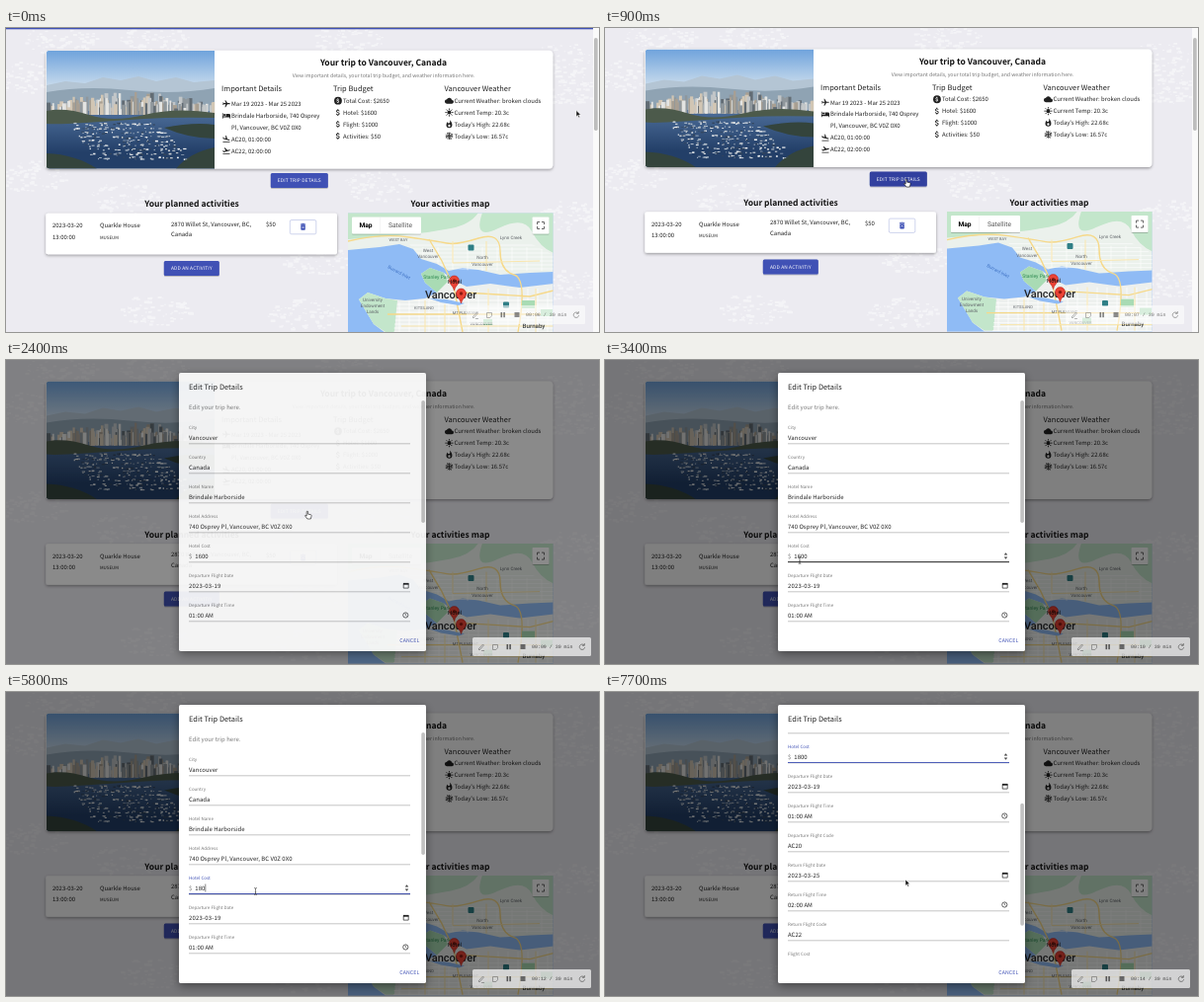
An HTML page for the animation above (8000 ms loop, 600x308 px).

```html
<!DOCTYPE html>
<html lang="en">
<head>
<meta charset="utf-8">
<title>Trip details</title>
<style>
  html, body { margin: 0; width: 100%; height: 100%; overflow: hidden; background: #ecebf1; }
  svg { display: block; width: 600px; height: 308px; }
  text { font-family: "Noto Sans CJK JP", "Noto Sans CJK SC", "Source Sans Pro", "Noto Sans", sans-serif;
    white-space: pre; text-rendering: geometricPrecision; }
  .map text { font-family: Roboto, Arial, sans-serif; }
  text.mono { font-family: "Liberation Mono", "DejaVu Sans Mono", monospace; }
</style>
</head>
<body>
<svg id="stage" viewBox="0 0 600 308" xmlns="http://www.w3.org/2000/svg"></svg>
<script>
const BLUE = '#3f51b5', INK = '#212121', GREY = '#757575';
const LOOP = 8000, STEP = 100;

let seed = 11;
const rnd = (a = 0, b = 1) => {
  seed = (seed * 16807) % 2147483647;
  return a + (b - a) * seed / 2147483647;
};
const many = (n, make) => Array.from({ length: n }, (_, i) => make(i)).join('');
const text = (x, y, s, size = 5.95, fill = INK, extra = '') =>
  `<text x="${x}" y="${y}" font-size="${size}" fill="${fill}" ${extra}>${s}</text>`;
const rect = (x, y, w, h, fill, extra = '') =>
  `<rect x="${x}" y="${y}" width="${w}" height="${h}" fill="${fill}" ${extra}/>`;
const path = (d, fill, extra = '') => `<path d="${d}" fill="${fill}" ${extra}/>`;
const line = (d, stroke, width, extra = '') =>
  path(d, 'none', `stroke="${stroke}" stroke-width="${width}" ${extra}`);
const MID = 'text-anchor="middle"', BOLD = 'font-weight="700"';

// Icons live in a 24 unit box.
const SHAPES = {
  plane: 'M21 16v-2l-8-5V3.5C13 2.7 12.3 2 11.5 2S10 2.7 10 3.5V9l-8 5v2l8-2.5V19l-2 1.5V22l3.5-1 3.5 1v-1.5L13 19v-5.5z',
  bed: 'M7 13a3 3 0 1 0 0-6 3 3 0 0 0 0 6zm12-6h-8v7H3V5H1v15h2v-3h18v3h2v-9a4 4 0 0 0-4-4z',
  land: 'M2.5 19h19v2h-19zM9.7 13.3l9.6 2.5c.8.2 1.6-.3 1.8-1 .2-.8-.2-1.6-1-1.9l-5.3-1.4L12 2.5 10.1 2v8.3L5.2 9l-1-2.4-1.4-.4v5.2z',
  takeoff: 'M2.5 19h19v2h-19zM22 9.6c-.2-.8-1-1.2-1.8-1L15 10 8 3.6l-1.9.5 4.1 7.1-5 1.4-2-1.6-1.4.4 2.6 4.5L21 11.5c.8-.2 1.2-1 1-1.9z',
  dollar: 'M11.8 10.9c-2.3-.6-3-1.2-3-2.1 0-1.1 1-1.9 2.7-1.9 1.8 0 2.4.9 2.5 2.1h2.2c-.1-1.7-1.1-3.3-3.2-3.8V3h-3v2.2c-1.9.4-3.5 1.7-3.5 3.6 0 2.3 1.9 3.4 4.7 4.1 2.5.6 3 1.5 3 2.4 0 .7-.5 1.8-2.7 1.8-2.1 0-2.9-.9-3-2.1H6.3c.1 2.2 1.8 3.4 3.7 3.8V21h3v-2.2c2-.3 3.5-1.5 3.5-3.5 0-2.8-2.4-3.8-4.7-4.4z',
  cloud: 'M19.4 10A7.5 7.5 0 0 0 5.4 8 6 6 0 0 0 6 20h13a5 5 0 0 0 .4-10z',
  flame: 'M13.5.7s.7 2.6.7 4.8c0 2-1.3 3.7-3.4 3.7S7.2 7.5 7.2 5.1C5.2 7.5 4 10.6 4 14a8 8 0 0 0 16 0c0-5.4-2.6-10.2-6.5-13.3z',
  bin: 'M6 19c0 1.1.9 2 2 2h8c1.1 0 2-.9 2-2V7H6zM19 4h-3.5l-1-1h-5l-1 1H5v2h14z'
};
const box = (x, y, inner, k = .372) => `<g transform="translate(${x} ${y}) scale(${k})">${inner}</g>`;
const rays = (n, d, w) => many(n, i => line(d, INK, w, `transform="rotate(${i * 360 / n} 12 12)"`));
const ICONS = {
  plane: path(SHAPES.plane, INK, 'transform="rotate(90 12 12)"'),
  coin: `<circle cx="12" cy="12" r="10.5" fill="${INK}"/>` +
    path(SHAPES.dollar, '#fff', 'transform="translate(3.3 3.3) scale(.72)"'),
  sun: `<circle cx="12" cy="12" r="5.5" fill="${INK}"/>` + rays(8, 'M12 1v4', 2.4),
  flake: rays(4, 'M12 12V2M7.5 3L12 7.5 16.500 3M12 12l4.500-4.500h5', 2),
  fire: path(SHAPES.flame, INK) + '<ellipse cx="12" cy="16" rx="3" ry="3.5" fill="#fff"/>'
};
const icon = (name, x, y) => box(x, y, ICONS[name] || path(SHAPES[name], INK));

function photo() {
  const hills = path('M41 58L60 54 80 56 98 50 116 53 134 49 152 54 172 50 190 55 211 53V82H41z', '#b4c5d4') +
    path('M41 65Q80 58 125 63T211 61V84H41z', '#8fa3b3');
  const towers = many(190, i => {
    const x = rnd(41, 209), h = rnd(4, 13) + 11 * rnd() * Math.sin((x - 35) / 58);
    const tone = ['#e3e4e2', '#c2c6c8', '#8f979c', '#d2c6b4', '#626c74', '#a89f92'][i % 6];
    return rect(x, 88 - Math.max(3, h), rnd(1.5, 4), Math.max(3, h), tone);
  });
  const shore = path('M41 84Q60 80 84 88T140 88T211 86V91Q170 90 140 92T80 96 41 97z', '#4c5a4b');
  const quay = path('M160 101Q190 95 211 98V112Q185 112 160 101zM41 127Q70 128 92 142.5H41zM172 142.5Q186 126 211 121V142.5z', '#34443c');
  const boats = many(300, i => {
    const row = i % 9;
    return rect(rnd(64 + row * 3, 150 + row * 5), 97 + row * 4.3 + rnd(-1.2, 1.2), rnd(.7, 3.4), rnd(.6, 1.6),
      ['#eef0f1', '#aebbc8', '#c9ced2', '#33455c'][i % 4]);
  });
  return `<g clip-path="url(#photoClip)">${rect(41, 23, 170, 64, 'url(#sky)')}${hills}${rect(41, 84, 170, 60, 'url(#sea)')}
    ${towers}${shore}${quay}${boats}</g>`;
}

const pin = (x, y) =>
  path('M0 0C-1-5-5-6-5-10a5 5 0 0 1 10 0C5-6 1-5 0 0z', '#ea4335', `stroke="#b31412" stroke-width=".5" transform="translate(${x} ${y})"`) +
  `<circle cx="${x}" cy="${y - 10}" r="1.7" fill="#8c1a12"/>`;

function cityMap() {
  const WATER = '#8fbbf5', GREEN = '#c3e6cb', PARK = '#a9dbb4';
  const label = (x, y, s, size = 4.6, fill = '#5f6368', extra = '') => text(x, y, s, size, fill, `${MID} ${extra}`);
  const north = 'M346 187H554V247L530 248 500 250 478 245 462 243 448 246 436 239 420 234 412 224 398 219 378 222 346 225z';
  const south = 'M357 275L366 268 384 274 404 276 424 274 436 268 424 258 420 249 429 243 443 248 452 255 466 262 490 259 520 263 554 259V309H384L372 300z';
  const streets = many(17, i => line(`M${388 + i * 10} 262V309M384 ${276 + i * 4}H554`, '#fff', .7));
  const northStreets = many(9, i => line(`M${422 + i * 15} 222V250M408 ${220 + i * 4}H554`, '#fff', .6));
  const roads = line('M346 216Q380 208 408 212T446 218 478 213 500 226 514 250 518 308M428 214L441 236 453 262 462 308M386 290H554M464 268L530 272 554 266', '#f6d98a', 1.4) +
    line('M452 216V238L540 236M486 216V246M424 276V308M444 280V308M488 264V308M536 264V308M400 302H554', '#fae6ad', 1);
  return `<g class="map" clip-path="url(#mapClip)">
    ${rect(346, 187, 208, 122, WATER)}
    ${path(north, '#ebf1ec')}${path('M346 187H478Q470 199 450 203T408 209 346 214zM482 187H554V228Q540 222 532 206T498 203 482 187z', GREEN)}
    <g clip-path="url(#northClip)">${northStreets}</g>
    ${path(south, '#edf0ee')}${path('M357 275L366 268 384 274 396 276 393 308H384L372 300z', GREEN)}
    <g clip-path="url(#southClip)">${streets}</g>${roads}
    ${path('M436 268L424 258 420 249 429 243 443 248 447 257z', PARK)}
    ${path('M428 274L446 275 464 279 458 281 440 278z', WATER)}
    ${rect(522, 276, 13, 8, PARK)}${rect(483, 295, 9, 6, PARK)}${rect(541, 285, 12, 7, PARK)}
    ${rect(467.5, 219.5, 6, 6, '#2f7f86', 'rx="1"')}${rect(503, 277.5, 6, 6, '#2f7f86', 'rx="1"')}
    ${label(397, 216, 'WEST BAY', 4)}${label(427, 226.5, 'West')}${label(427, 233, 'Vancouver')}
    ${label(511, 214, 'Lynn Creek')}${label(482, 234, 'North')}${label(482, 241, 'Vancouver')}
    ${label(397, 249, 'Burrard Inlet', 4.6, '#3f72c4', 'transform="rotate(28 397 249)"')}
    ${label(436, 254, 'Stanley Park', 5, '#2f8a52')}
    ${label(371, 277, 'University')}${label(371, 283, 'Endowment')}${label(371, 289, 'Lands')}
    ${label(423, 285, 'KITSILANO', 4)}${label(465, 290, 'MT PLEASANT', 4)}${label(481, 301, 'VANCOUVER', 4)}
    ${label(534, 303.8, 'Burnaby', 6.2, '#3c4043', 'font-weight="500"')}
    ${label(450, 274, 'Vancouver', 11, '#202124', 'font-weight="500"')}
    ${pin(453.5, 266)}${pin(460.5, 279)}
    ${label(454, 259, 'Hotel', 5.8, '#111')}
    <g filter="url(#soft)">${rect(350, 191.5, 70, 17, '#fff', 'rx="1"')}${rect(532.5, 191.5, 17, 17, '#fff', 'rx="1"')}</g>
    ${label(364, 202.3, 'Map', 6.7, '#000', BOLD)}${label(399, 202.3, 'Satellite', 6.7, '#565656')}
    ${line('M378.5 192v16', '#e6e6e6', .4)}
    ${line('M537.5 199v-2.5h2.5M542 196.5h2.5v2.5M544.5 201v2.5h-2.5M540 203.5h-2.5v-2.5', '#666', 1)}
  </g>`;
}

function column(x, title, y, rows) {
  return text(x, 64.3, title, 7.44, INK, 'letter-spacing=".03"') + rows.map(([name, s], i) =>
    (name ? icon(name, x + .5, y - 6.6 + i * 11.9) : '') + text(x + 10, y + i * 11.9, s)).join('');
}

function button(id, x, y, w, label) {
  return `<g filter="url(#soft)">${rect(x, y, w, 15, BLUE, `rx="1.5" id="${id}"`)}</g>` +
    text(x + w / 2, y + 9.2, label, 4.84, '#fff', `${MID} letter-spacing=".14"`);
}

// Rough centres of the faint continents behind the page.
const LANDS = [[55, 12], [150, 12], [345, 12], [565, 30], [572, 62], [15, 50], [375, 160],
  [120, 172], [310, 235], [150, 285], [575, 190], [570, 260], [25, 150], [300, 290]];
const land = ([x, y]) => path(many(90, () => {
  const a = rnd(0, 6.283), r = Math.sqrt(rnd()), w = rnd(1, 5);
  return `M${(x + 36 * r * Math.cos(a)).toFixed(1)} ${(y + 16 * r * Math.sin(a)).toFixed(1)}h${w.toFixed(1)}v${(w * .5).toFixed(1)}h${(-w).toFixed(1)}z`;
}), '#f7f7fa', 'opacity=".75"');

function page() {
  return LANDS.map(land).join('') + rect(0, -4, 600, 5.3, BLUE) +
    `<g filter="url(#shadow)">${rect(40.5, 22.8, 512.8, 119.7, '#fff', 'rx="4"')}</g>` + photo() +
    text(382, 38, 'Your trip to Vancouver, Canada', 8.5, '#111', `${MID} ${BOLD}`) +
    text(382, 50.3, 'View important details, your total trip budget, and weather information here.', 5.2, GREY, MID) +
    column(218, 'Important Details', 79, [['plane', 'Mar 19 2023 - Mar 25 2023'], ['bed', 'Brindale Harborside, 740 Osprey'],
      ['', 'Pl, Vancouver, BC V0Z 0X0'], ['land', 'AC20, 01:00:00'], ['takeoff', 'AC22, 02:00:00']]) +
    column(331, 'Trip Budget', 75.8, [['coin', 'Total Cost: $2650'], ['dollar', 'Hotel: $1600'], ['dollar', 'Flight: $1000'], ['dollar', 'Activities: $50']]) +
    column(443.5, 'Vancouver Weather', 75.8, [['cloud', 'Current Weather: broken clouds'], ['sun', 'Current Temp: 20.3c'],
      ['fire', "Today's High: 22.68c"], ['flake', "Today's Low: 16.57c"]]) +
    button('edit', 267.8, 147, 58, 'EDIT TRIP DETAILS') + button('add', 159.8, 236, 56, 'ADD AN ACTIVITIY') +
    text(188, 181, 'Your planned activities', 8.5, '#111', `${MID} ${BOLD}`) +
    text(449.5, 181, 'Your activities map', 8.5, '#111', `${MID} ${BOLD}`) +
    `<g filter="url(#shadow)">${rect(40.3, 187.7, 294.7, 41.5, '#fff', 'rx="2"')}</g>` +
    text(47, 202, '2023-03-20') + text(47, 213.8, '13:00:00') +
    text(95, 202, 'Quarkle House') + text(95, 213.8, 'MUSEUM', 4.46) +
    text(167, 200.8, '2870 Willet St, Vancouver, BC,') + text(167, 211.3, 'Canada') + text(263, 201, '$50') +
    rect(287.3, 194.5, 26.5, 14.3, '#fff', 'rx="1.5" stroke="#9fa8da" stroke-width=".5"') +
    box(296.1, 197, path(SHAPES.bin, BLUE) + line('M9.5 11l5 5M14.5 11l-5 5', '#fff', 1.5)) + cityMap();
}

const FIELDS = [['City', 'Vancouver'], ['Country', 'Canada'], ['Hotel Name', 'Brindale Harborside'],
  ['Hotel Address', '740 Osprey Pl, Vancouver, BC V0Z 0X0'], ['Hotel Cost', '1600', 'cost'],
  ['Departure Flight Date', '2023-03-19', 'date'], ['Departure Flight Time', '01:00 AM', 'time'], ['Departure Flight Code', 'AC20'],
  ['Return Flight Date', '2023-03-25', 'date'], ['Return Flight Time', '02:00 AM', 'time'], ['Return Flight Code', 'AC22'],
  ['Flight Cost', '1000', 'cost']];

function field([label, value, kind], i) {
  const y = 78.5 + i * 30, active = label === 'Hotel Cost';
  let out = text(185, y - 8.5, label, 4.46, GREY, `letter-spacing=".04" ${active ? 'id="costLabel"' : ''}`) +
    line(`M185 ${y + 6.3}H409`, '#8a8a8a', .5);
  if (kind === 'cost') out += text(185, y + 2.2, '$', 5.95, GREY);
  out += text(kind === 'cost' ? 191.3 : 185, y + 2.2, value, 5.95, INK,
    `letter-spacing="${kind === 'date' ? .2 : .05}" ${active ? 'id="cost"' : ''}`);
  if (kind === 'date') out += line(`M402.2 ${y - 2}h5v4.6h-5z`, '#222', .7) + rect(402, y - 2.6, 5.4, 1.8, '#222');
  if (kind === 'time') out += `<circle cx="404.3" cy="${y}" r="2.6" fill="none" stroke="#222" stroke-width=".7"/>` +
    line(`M404.3 ${y - 1.7}V${y}l1.2 .9`, '#222', .6);
  if (active) out += `<g id="spinner">${path(`M403.7 ${y - 1}l1.8-2.2 1.8 2.2zM403.7 ${y + 1}l1.8 2.2 1.8-2.2z`, '#444')}</g>` +
    rect(185, y + 5.7, 224, .9, INK, 'id="hoverLine"') + rect(185, y + 5.6, 224, .9, BLUE, 'id="focusLine"') +
    rect(0, y - 4, .5, 8, '#111', 'id="caret"');
  return out;
}

function dialog() {
  return `<g filter="url(#deep)">${rect(175, 13, 250, 282, '#fff', 'rx="1.8"')}</g>` +
    text(185, 29.7, 'Edit Trip Details', 7.4, INK, 'font-weight="500" letter-spacing=".04"') +
    `<g clip-path="url(#formClip)"><g id="form">${text(185, 50.3, 'Edit your trip here.', 5.95, GREY, 'letter-spacing=".05"')}
    ${FIELDS.map(field).join('')}</g></g>
    ${rect(420.3, 41, 3.6, 124, '#c1c1c1', 'id="thumb" rx="1.8"')}
    ${text(398.2, 285.7, 'CANCEL', 5.2, BLUE, 'font-weight="500" letter-spacing=".13"')}`;
}

const recorder = () => rect(472, 281, 120, 19, '#fff', 'id="panel" rx="1.5"') +
  `<g id="controls">${line('M478 293l4.5-5 1 1-4.5 5zM481 294.5h3', '#777', .7)}
  ${line('M492.5 288.5h5v3.2l-1.7 1.8h-3.3z', '#777', .7)}
  ${rect(506.5, 288, 1.6, 5.2, '#555')}${rect(509.3, 288, 1.6, 5.2, '#555')}${rect(520.5, 288, 5, 5, '#666')}
  ${text(532, 292.3, '', 4.95, '#444', 'class="mono" id="clock"')}
  ${line('M585 289a2.7 2.7 0 1 0 .6 2.2M585.3 287v2.3h-2.3', '#666', .8)}</g>`;

const POINTERS = {
  arrow: path('M0 0V6.2L1.5 4.9 2.5 7.2 3.5 6.7 2.5 4.5H4.5z', '#111', 'stroke="#fff" stroke-width=".5"'),
  hand: path('M-.8-1.5Q0-2.3.6-1.5V1.2L3.5 1.7Q4.2 2 4 3.2L3.3 6H-.1L-2.5 2.7Q-2.3 1.8-.8 3z', '#fff', 'stroke="#111" stroke-width=".6"'),
  beam: line('M-1.3-3.5Q0-3.5 0-2.7 0-3.5 1.3-3.5M0-3V3M-1.3 3.5Q0 3.5 0 2.7 0 3.5 1.3 3.5M-.8 1H.8', '#333', .6)
};

const shade = (id, dy, blur, alpha) => `<filter id="${id}" x="-20%" y="-20%" width="140%" height="150%">
  <feDropShadow dx="0" dy="${dy}" stdDeviation="${blur}" flood-opacity="${alpha}"/></filter>`;
const clip = (id, shape) => `<clipPath id="${id}">${shape}</clipPath>`;
const fade = (id, from, to) => `<linearGradient id="${id}" x2="0" y2="1"><stop stop-color="${from}"/><stop offset=".7" stop-color="${to}"/></linearGradient>`;

document.getElementById('stage').innerHTML = `<defs>
  ${shade('soft', .6, .7, .35)}${shade('shadow', 1.2, 1.7, .38)}${shade('deep', 3, 5, .4)}
  ${fade('sky', '#6fa3dc', '#dde8f0')}${fade('sea', '#4d6e9a', '#233f68')}
  ${clip('photoClip', '<path d="M44.5 22.8H211.300V142.500H44.5a4 4 0 0 1-4-4V26.800a4 4 0 0 1 4-4z"/>')}
  ${clip('mapClip', rect(345.7, 187.5, 207.8, 130, '#000'))}
  ${clip('northClip', path('M408 219H532L554 230V246H478L448 244 420 232z', '#000'))}
  ${clip('southClip', path('M396 278L440 272 466 264H554V309H392z', '#000'))}
  ${clip('formClip', rect(175, 40.5, 245, 232.5, '#000'))}</defs>
  ${rect(0, 0, 600, 308, '#ecebf1')}<g id="page">${page()}</g>
  <g id="bar">${rect(594, 0, 6, 308, '#fafafa')}${rect(595, 10, 3.7, 94, '#bdbdbd', 'rx="1.8"')}</g>
  ${rect(0, 0, 600, 308, '#000', 'id="backdrop"')}
  <g id="dialog">${dialog()}</g><g id="recorder">${recorder()}</g>
  <g id="pointer">${Object.keys(POINTERS).map(k => `<g id="${k}">${POINTERS[k]}</g>`).join('')}</g>`;

const $ = id => document.getElementById(id);
const set = (id, name, value) => $(id).setAttribute(name, value);
const show = (id, on) => set(id, 'visibility', on ? 'visible' : 'hidden');
const clamp = v => Math.min(1, Math.max(0, v));

function along(keys, t, k = 1) {
  const i = keys.findIndex(key => key[0] > t);
  if (i < 0) return keys[keys.length - 1][k];
  if (i === 0) return keys[0][k];
  const a = keys[i - 1], b = keys[i];
  return a[k] + (b[k] - a[k]) * (t - a[0]) / (b[0] - a[0]);
}
const latest = (keys, t) => keys.filter(key => key[0] <= t).pop();

const TICKS = [300, 1300, 2300, 3300, 4300, 5200, 6300, 7300];
const TYPING = [[0, '1600'], [3900, '1600'], [5500, '16'], [5600, '1'], [5800, '180'], [5900, '1800']];
const PATH = [[0, 577, 83.5], [200, 552, 92], [500, 400, 135], [800, 309, 154], [900, 305, 155], [2900, 305, 155],
  [3100, 272, 172], [3400, 197, 203], [3800, 206, 202], [4300, 206, 202], [4500, 252.5, 202], [6200, 252.5, 202], [6700, 304, 190]];
const PAGE_SCROLL = [[200, 0], [500, 1.4]];
const FORM_SCROLL = [[6900, 0], [7000, 7], [7200, 50], [7400, 102], [7600, 129], [7700, 133]];

function draw(now) {
  const t = Math.floor(now % LOOP / STEP) * STEP;
  const p = clamp((t - 2150) / 350), open = 1 - (1 - p) ** 2;
  const modal = t >= 2150, focused = t >= 3900, scroll = along(FORM_SCROLL, t);

  set('page', 'transform', `translate(0 ${-along(PAGE_SCROLL, t)})`);
  set('edit', 'fill', t >= 800 ? '#303f9f' : BLUE);
  show('bar', !modal);
  set('backdrop', 'opacity', open * .5);
  set('dialog', 'opacity', open);

  set('form', 'transform', `translate(0 ${-scroll})`);
  set('thumb', 'y', 41 + scroll * .54);
  const [edited, value] = latest(TYPING, t);
  $('cost').textContent = value;
  set('costLabel', 'fill', focused ? BLUE : GREY);
  set('caret', 'x', 191.6 + $('cost').getComputedTextLength());
  show('caret', focused && (t - edited) % 1000 < 500);
  show('spinner', t >= 3300);
  show('hoverLine', t >= 3300 && t < 6500);
  const grow = clamp((t - 3800) / 300);
  set('focusLine', 'x', 297 - 112 * grow);
  set('focusLine', 'width', 224 * grow);

  set('recorder', 'transform', `translate(${modal ? 0 : -6} 0)`);
  set('panel', 'opacity', modal ? .68 : .55);
  set('controls', 'opacity', modal ? 1 : .75);
  $('clock').textContent = `00:${String(6 + TICKS.filter(k => k <= t).length).padStart(2, '0')} / 30 min`;

  const kind = t >= 800 && t < 2900 ? 'hand' : t >= 3300 && t < 6400 ? 'beam' : 'arrow';
  for (const k in POINTERS) show(k, k === kind);
  set('pointer', 'transform', `translate(${along(PATH, t, 1)} ${along(PATH, t, 2)})`);
}

function frame() {
  draw(performance.now());
  requestAnimationFrame(frame);
}
frame();
</script>
</body>
</html>
```
